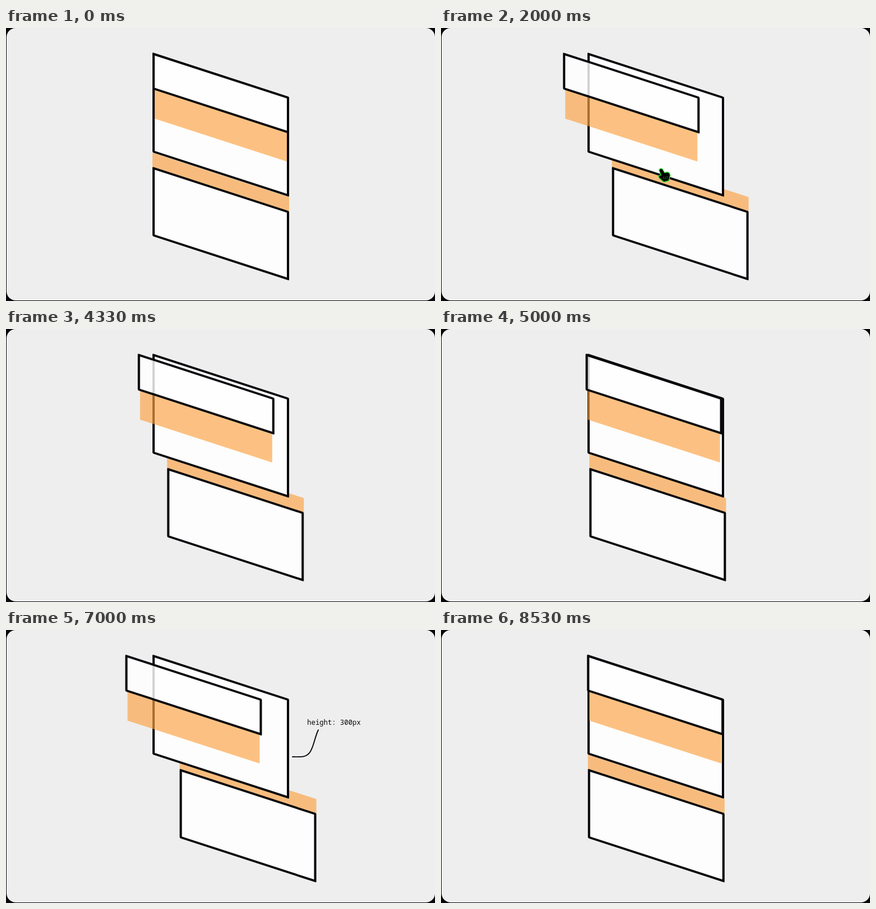
These frames come from a looping animation (750 px wide and 478 px high, 8590 ms). An HTML page:

```html
<!DOCTYPE html>
<html lang="en">
<head>
<meta charset="utf-8">
<title>Exploded panels</title>
<style>
  html, body { margin: 0; width: 100%; height: 100%; overflow: hidden; background: #08080c; }
  svg { display: block; width: 100vw; height: 100vh; }
  .panel { fill: #fdfdfd; stroke: #08080d; stroke-width: 4; stroke-linejoin: round; }
  .glass { fill: rgba(255, 255, 255, .82); }
  .spacing { fill: #fca344; fill-opacity: .66; }
  text { font: 12px "Noto Sans Mono", "DejaVu Sans Mono", monospace; fill: #08080d; }
</style>
</head>
<body>
<svg viewBox="0 0 750 478">
  <defs>
    <path id="hand" d="M-2 0Q-1 -2 1 -1L5 6L11 5Q14 6 14 9L12 17L5 19L-2 13Q-4 10 -1 10L2 11Z"/>
  </defs>
  <rect x="1" width="749" height="477" rx="16" fill="#eee"/>

  <g id="lower">
    <g transform="matrix(1 .3255 0 1 258 45.5)">
      <rect class="spacing" x="-2" y="173.4" width="239" height="26.6"/>
      <rect class="panel" y="200" width="235" height="117.5"/>
    </g>
  </g>

  <g transform="matrix(1 .3255 0 1 258 45.5)">
    <rect class="panel" width="235" height="171"/>
  </g>

  <g id="upper">
    <g transform="matrix(1 .3255 0 1 258 45.5)">
      <rect class="spacing" x="2" y="60.5" width="231" height="52"/>
      <rect class="panel glass" width="235" height="60.5"/>
    </g>
  </g>

  <g id="label">
    <text x="526.5" y="166">height: 300px</text>
    <path d="M546 175C540 187 538 204 532 213C525 224 515 222 501 222"
          fill="none" stroke="#08080d" stroke-width="1.9" stroke-linecap="round"/>
  </g>

  <g id="cursor" stroke-linejoin="round">
    <use href="#hand" stroke="#22d52c" stroke-width="4.5"/>
    <use href="#hand" stroke="#000" stroke-width="1.6"/>
    <path d="M4 11L5 16M7 10.5L8 15.5M10 10L10.5 14.5" stroke="#2a8a32" stroke-width=".8"/>
  </g>
</svg>

<script>
const LOOP = 8590;
const FPS = 15;
const SPREAD = 48;
const RATE = 3.08 / 1000;

const [lower, upper, label, cursor] =
  ["lower", "upper", "label", "cursor"].map(id => document.getElementById(id));

// Times at which the panels get a new target distance
const targets = [[1280, SPREAD], [4130, 0], [5490, SPREAD], [7200, 0]];

// Each visit: the pointer enters, rests, then leaves
const visits = [
  { enter: 1060, arrive: 1600, leave: 3620, exit: 4005,
    from: [679, 236], rest: [385, 249], to: [396, 30] },
  { enter: 5262, arrive: 6000, leave: 6560, exit: 6935,
    from: [372, 8], rest: [327, 291], to: [352, 10] }
];

const clamp = v => Math.min(1, Math.max(0, v));
const mix = (a, b, k) => a.map((v, i) => v + (b[i] - v) * k);

function distance(t) {
  let value = 0;
  targets.forEach(([start, goal], i) => {
    if (t <= start) return;
    const end = Math.min(t, targets[i + 1]?.[0] ?? t);
    value = goal + (value - goal) * Math.exp(-RATE * (end - start));
  });
  return value;
}

function pointer(t) {
  const v = visits.find(v => t >= v.enter && t <= v.exit);
  if (!v) return null;
  const arriving = clamp((t - v.enter) / (v.arrive - v.enter));
  const leaving = clamp((t - v.leave) / (v.exit - v.leave));
  return leaving
    ? mix(v.rest, v.to, leaving ** 2)
    : mix(v.from, v.rest, 1 - (1 - arriving) ** 3);
}

function draw(t) {
  const d = distance(t);
  lower.setAttribute("transform", `translate(${d})`);
  upper.setAttribute("transform", `translate(${-d})`);
  label.setAttribute("opacity", clamp((d - 44) / 2));

  const tip = pointer(t);
  cursor.setAttribute("visibility", tip ? "visible" : "hidden");
  if (tip) cursor.setAttribute("transform", `translate(${tip})`);
}

const start = performance.now();
function tick() {
  const t = (performance.now() - start) % LOOP;
  draw(Math.floor((t + 4) * FPS / 1000) * 1000 / FPS);
  requestAnimationFrame(tick);
}
tick();
</script>
</body>
</html>
```
